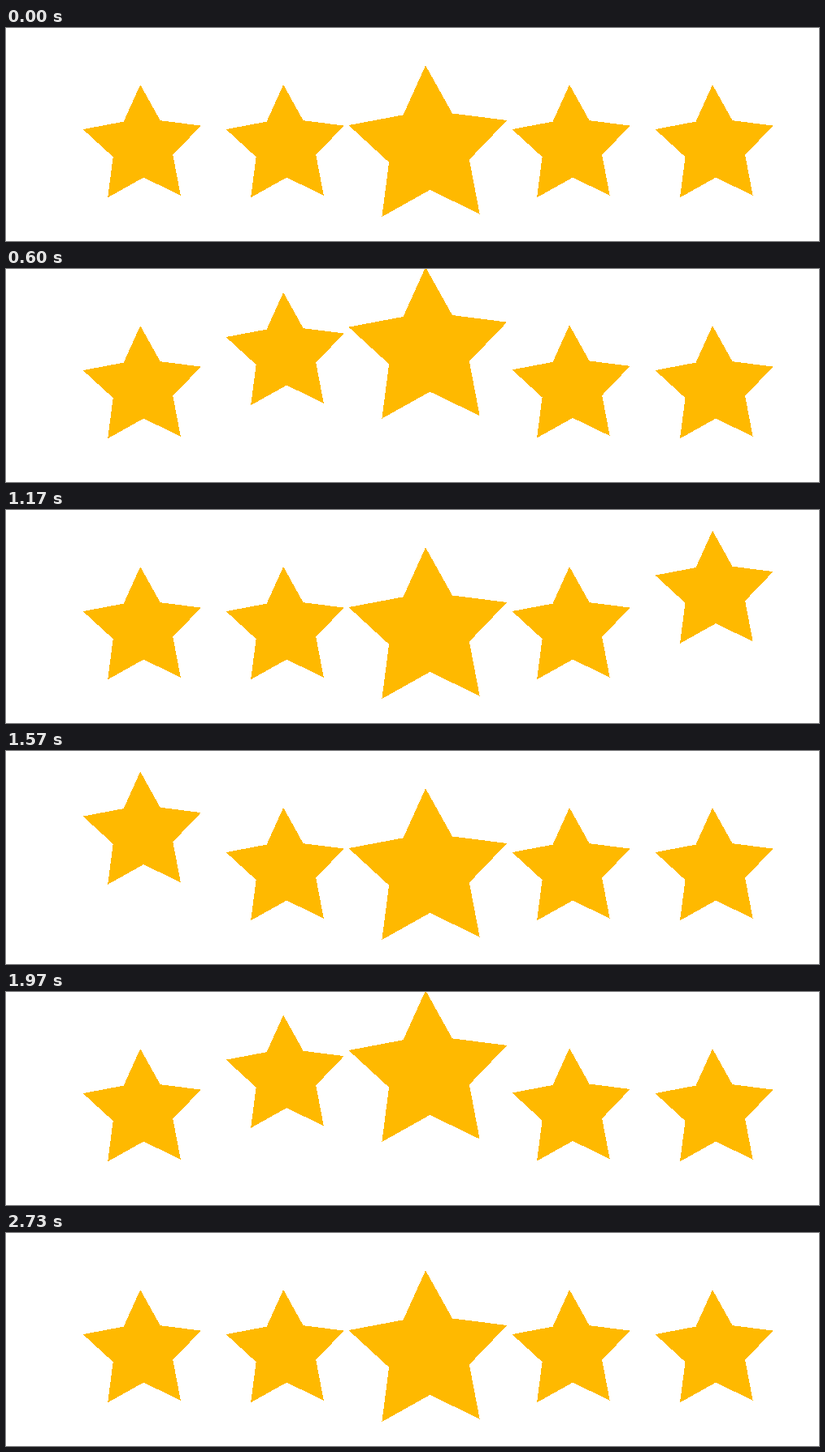
An HTML page that plays this animation: 1000 px wide and 263 px high, repeating every 2.76 s.

```html
<!DOCTYPE html>
<html lang="en">
<head>
<meta charset="utf-8">
<title>Five hopping stars</title>
<style>
  html, body { margin: 0; width: 100%; height: 100%; overflow: hidden; background: #fff; }
  svg { display: block; width: 100%; height: 100%; }
</style>
</head>
<body>
<svg id="stage" viewBox="0 0 1000 263" fill="#ffb900" shape-rendering="crispEdges"></svg>
<script>
const LOOP = 2760;              // ms
const FPS = 30;
const COUNT = 5;
const SPACING = 175.95;
const HEIGHT = 59;              // px of each hop
const HOP = 17.8;               // hop length, in ticks
const STAGGER = 5.79;           // delay between neighbours, in ticks
const WAVES = [0, 41.04];       // wave starts, in ticks
const CENTER = { x: 168.2, y: 139.8 };
const OUTLINE = '-3,-69.8 21.5,-25.6 71.6,-19.2 37.1,16.9 46.6,66.9 ' +
  '1,44.8 -43,69.5 -36.5,19.4 -73.5,-14.7 -23.5,-24.2';

const stage = document.getElementById('stage');
const stars = Array.from({ length: COUNT }, () => {
  const star = document.createElementNS(stage.namespaceURI, 'polygon');
  star.setAttribute('points', OUTLINE);
  return stage.appendChild(star);
});

function lift(tick) {
  return tick > 0 && tick < HOP ? HEIGHT * Math.sin(Math.PI * tick / HOP) ** 2 : 0;
}

function draw(ms) {
  const tick = Math.floor((ms % LOOP + 3.4) * FPS / 1000);
  stars.forEach((star, i) => {
    const rise = WAVES.reduce((sum, start) => sum + lift(tick - start - i * STAGGER), 0);
    const scale = i === 2 ? 1.342 : 1;
    star.setAttribute('transform',
      `translate(${CENTER.x + i * SPACING} ${CENTER.y - rise}) scale(${scale})`);
  });
}

const begin = performance.now();
function loop() {
  draw(performance.now() - begin);
  requestAnimationFrame(loop);
}
loop();
</script>
</body>
</html>
```
